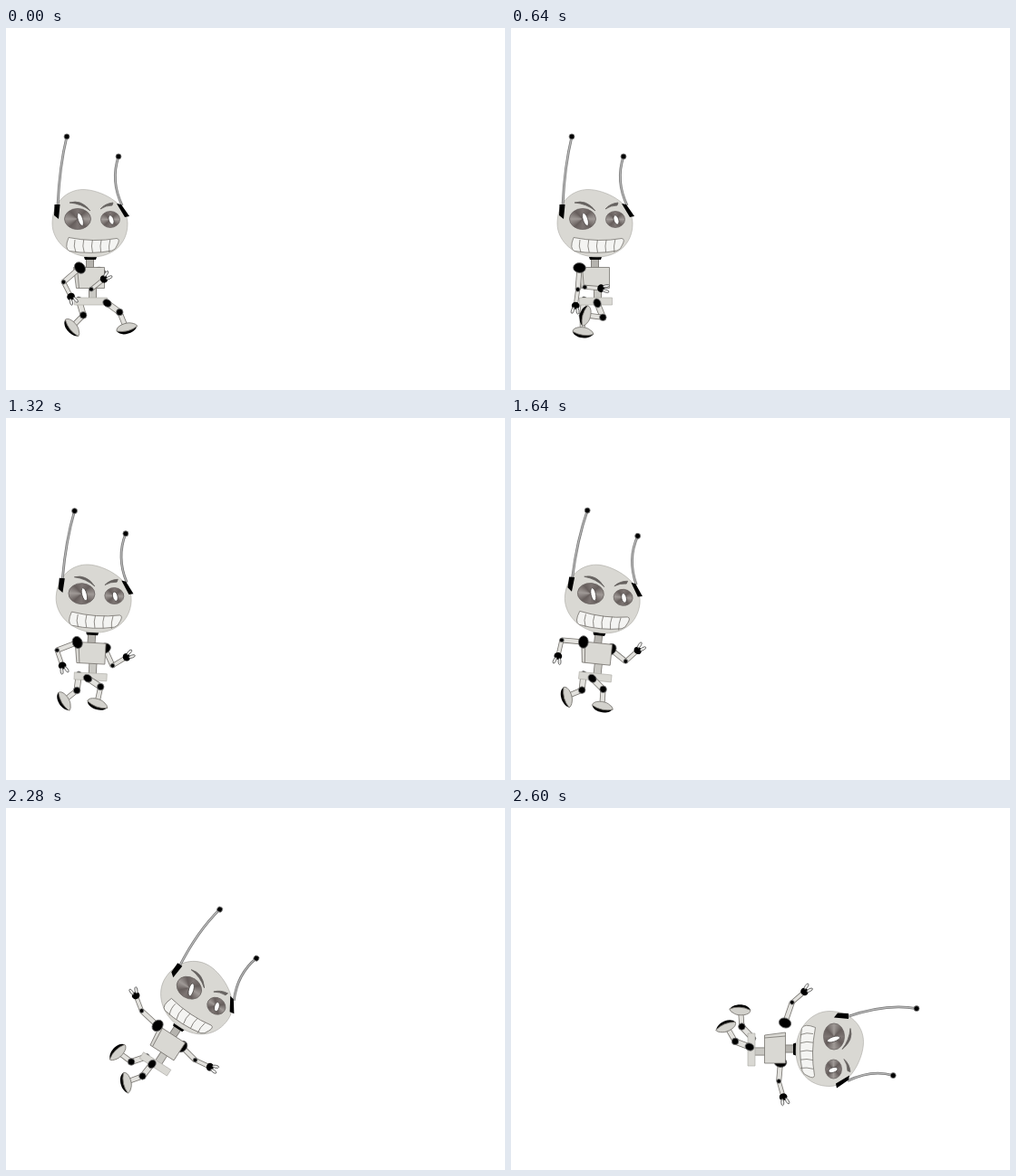
These frames come from a looping animation (550x400 px, 2.64 s). An HTML page with a canvas:

```html
<!DOCTYPE html>
<html lang="en">
<head>
<meta charset="utf-8">
<title>Robot tumble</title>
<style>
html, body { margin: 0; width: 100%; height: 100%; overflow: hidden; background: #fff; }
canvas { display: block; }
</style>
</head>
<body>
<canvas id="stage" width="550" height="400"></canvas>
<script>
const ctx = document.getElementById('stage').getContext('2d');
const LOOP = 2640, STEP = 40, WALK_END = 640, STRIDE = 960, RAD = Math.PI / 180;
const SHELL = '#d9d8d3', LINE = '#77746f', BLACK = '#000';

// Limbs hold two bone angles in degrees: 0 is right, 90 is down.
const pose = (time, body, nearArm, farArm, nearLeg, farLeg, gait = [0, 0]) =>
  ({ time, body, nearArm, farArm, nearLeg, farLeg, gait });

function legSwing(phase) {
  const c = Math.cos(phase), s = Math.sin(phase), lift = Math.cos(2 * phase);
  return [73 - 19 * c + 27 * s - 18 * lift, 126 - 33 * c - 37 * s - 25 * lift];
}
function walk(time) {
  const phase = time / STRIDE * 2 * Math.PI, c = Math.cos(phase), s = Math.sin(phase);
  return pose(time, [91.5, 276, 0],
    [126 + 13 * c + 29 * s, 115 - 52 * c + 50 * s], [125 - 8 * c, -10 - 29 * c],
    legSwing(phase), legSwing(phase + Math.PI), [1, c]);
}

// Stand, lean, tip over, glide, fall.
const poses = [
  walk(WALK_END),
  pose(1000, [91.5, 259.5, 0], [133, 39], [92, -21], [22, 110], [98, 126]),
  pose(1640, [93.5, 260, 6], [185, 103], [39, -42], [45, 94], [96, 157]),
  pose(1960, [100, 260, 30], [219, 201], [28, 3], [97, 106], [135, 200]),
  pose(2280, [177, 260, 33], [223, 249], [45, 25], [128, 160], [161, 217]),
  pose(2600, [291, 265, 90], [289, 319], [95, 74], [201, 240], [227, 266])];

function poseAt(time) {
  if (time <= WALK_END) return walk(time);
  const next = poses.findIndex(p => p.time >= time), a = poses[next - 1], b = poses[next];
  const k = (time - a.time) / (b.time - a.time);
  const mixed = {};
  for (const part in a) mixed[part] = [a[part]].flat().map((v, i) => v + ([b[part]].flat()[i] - v) * k);
  return mixed;
}

const polar = ([x, y], deg, length) =>
  [x + Math.cos(deg * RAD) * length, y + Math.sin(deg * RAD) * length];

// Joints of a two-bone limb hung at (x, y) on the body.
function chain(body, x, y, [first, second], upper, lower) {
  const root = polar(polar(body, body[2], x), body[2] + 90, y);
  const middle = polar(root, first, upper);
  return { root, middle, end: polar(middle, second, lower), first, second };
}

function shape(path, fill, stroke, width = 0.8) {
  const p = typeof path === 'string' ? new Path2D(path) : path;
  if (fill) { ctx.fillStyle = fill; ctx.fill(p); }
  if (stroke) { ctx.strokeStyle = stroke; ctx.lineWidth = width; ctx.stroke(p); }
}
function oval(x, y, rx, ry, deg, fill, stroke) {
  const p = new Path2D();
  p.ellipse(x, y, rx, ry, deg * RAD, 0, 7);
  shape(p, fill, stroke);
}
function tube([x1, y1], [x2, y2], width, fill = '#e2e1dd') {
  const line = `M${x1} ${y1}L${x2} ${y2}`;
  shape(line, null, LINE, width);
  shape(line, null, fill, width - 1.6);
}
function at([x, y], deg, draw) {
  ctx.save();
  ctx.translate(x, y);
  ctx.rotate(deg * RAD);
  draw();
  ctx.restore();
}
const joint = ([x, y], r) => oval(x, y, r, r, 0, BLACK, '#888');

function upperArm({ root, middle, first }) {
  tube(root, middle, 6);
  at(root, first, () => oval(0, 0, 5.4, 6.8, 0, BLACK, '#666'));
}
function forearm({ middle, end, second }) {
  tube(middle, end, 5);
  joint(middle, 2.4);
  at(end, second, () => {
    oval(0, 0, 4, 4.4, 0, BLACK);
    oval(5.5, -3, 3.6, 1.5, -15, '#f2f2f0', '#555');
    oval(5.5, 2.5, 3.6, 1.5, 12, '#f2f2f0', '#555');
  });
}
function leg({ root, middle, end, first, second }, hipSize) {
  tube(root, middle, 7);
  tube(middle, end, 6);
  joint(middle, 3.8);
  at(root, first, () => oval(0, 0, hipSize, hipSize * 0.8, 0, BLACK, '#777'));
  at(end, second - 92, () => {
    shape('M-11 3C-9 12 9 13 12 6Z', BLACK);
    shape('M-11 3C-10 -3 3 -2 7 1Q12 4 12 7Q0 10 -11 3Z', '#d2d1cc', LINE);
  });
}

function drawTorso() {
  tube([1, -9], [1, -21], 9, '#b5b3ae');
  tube([4, 11], [4, 23], 9, '#c9c8c3');
  shape('M-16 22H20V30H-16Z', SHELL, '#aaa8a3', 0.6);
  shape('M-17 -11.5H17V11.5H-14Z', SHELL, LINE);
  shape('M-13 -11.5L-11 11.5', null, LINE);
}

function eye(x, y, rx, ry, shift) {
  const iris = ctx.createConicGradient(0, x, y);
  for (let i = 0; i <= 8; i++) iris.addColorStop(i / 8, i % 2 ? '#665e5c' : i % 4 ? '#7d7573' : '#a09a97');
  oval(x, y, rx, ry, 0, iris, '#6a6462');
  oval(x + shift, y + 0.5, 2.7, rx * 0.5, -18, '#fff', '#4a4543');
}

function antenna(base, bow, tip) {
  const path = `M${base}Q${bow} ${tip}`;
  shape(path, null, '#777', 2.8);
  shape(path, null, '#bbb', 1.2);
  joint(tip, 3);
}

function drawHead(bend) {
  shape('M-11 42H3L2 45H-10Z', BLACK);
  shape('M-12 -32.5C6 -32.5 37 -18 37 5C37 28 20 42 -2 42C-28 42 -46 24 -46 5C-46 -18 -30 -32.5 -12 -32.5Z',
    SHELL, '#aaa8a3', 0.6);
  antenna([-40, -15], [-38 - bend * 0.9, -58], [-30 - bend, -91]);
  antenna([31, -15], [18, -42], [27 - bend * 0.1, -69 + bend * 0.2]);
  shape('M-43.5 -16H-37.5L-39 0L-44 -4Z', BLACK);
  shape('M25 -17L30 -16L39 -3L34 -2Z', BLACK);
  eye(-18, 0, 14.5, 11.5, 3);
  eye(18, 0.5, 10.5, 9, 1);
  shape('M-27 -18Q-14 -22 -4 -9Q-14 -17 -27 -18Z', '#65615f', '#65615f');
  shape('M7 -11Q12 -17 21 -18L20 -15Q13 -15 7 -11Z', '#65615f', '#65615f');
  shape('M-28 20.5Q0 26 25 21.5Q29 22 26 28Q24 34 20 35Q-3 39.5 -27 35.5Q-33 33 -28 20.5Z', '#f4f4f2', LINE);
  for (let x = -21; x < 20; x += 9.7) shape(`M${x} 23Q${x - 2} 30 ${x - x / 20} 37`, null, LINE);
}

function render(time) {
  const { body, gait: [walking, sway], ...limbs } = poseAt(time);
  const tilt = body[2];
  const nearArm = chain(body, -14 + 4 * sway - 0.15 * tilt, -11, limbs.nearArm, 24, 18);
  const farArm = chain(body, 16 - 10 * walking + 6 * sway, -6, limbs.farArm, 21, 18);
  const nearLeg = chain(body, -1 + 10 * walking + 11 * sway, 28, limbs.nearLeg, 17, 15);
  const farLeg = chain(body, -11, 25, limbs.farLeg, 17, 14);

  ctx.clearRect(0, 0, 550, 400);
  upperArm(farArm);
  leg(farLeg, 4);
  at(body, tilt, drawTorso);
  leg(nearLeg, 5);
  forearm(farArm);
  upperArm(nearArm);
  forearm(nearArm);
  at(body, tilt, () => {
    ctx.translate(5.5, -65);
    drawHead(tilt * 0.21);
  });
}

const start = performance.now();
function tick() {
  const time = (performance.now() - start) % LOOP;
  render(Math.floor(time / STEP) * STEP);
  requestAnimationFrame(tick);
}
tick();
</script>
</body>
</html>
```
